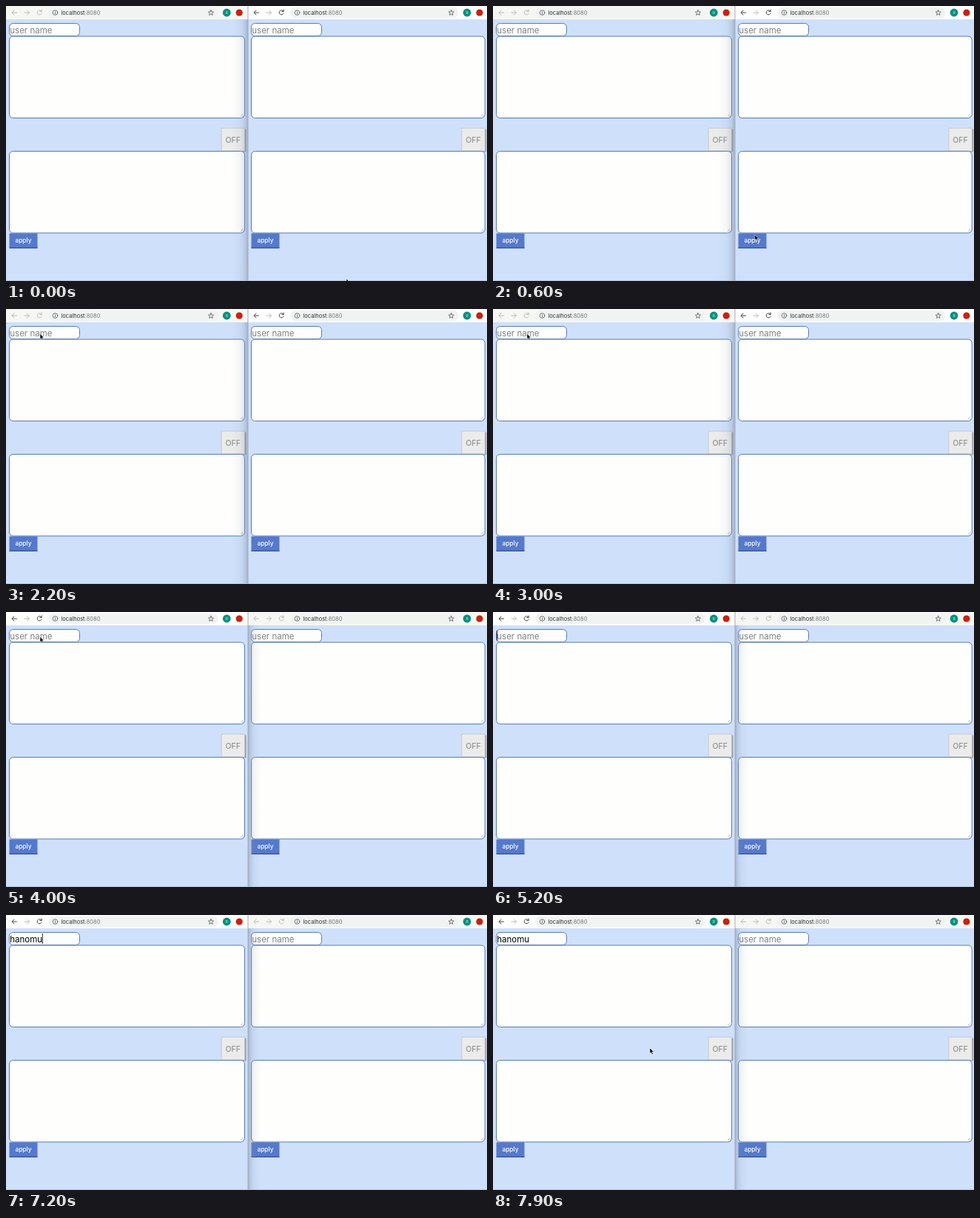
These frames come from a looping animation (650 by 372 pixels, 8000 ms). An HTML page:

```html
<!DOCTYPE html>
<html lang="en">
<head>
<meta charset="utf-8">
<title>Two chat windows</title>
<style>
html, body { margin: 0; width: 100%; height: 100%; overflow: hidden; background: #cfe0fb; }
svg { display: block; width: 650px; height: 372px; }
text { font-family: Inter, "Liberation Sans", sans-serif; white-space: pre; }
.icon { fill: none; stroke-width: 1; stroke-linecap: round; stroke-linejoin: round; }
.field { fill: #fefefd; stroke: #587bb0; stroke-width: 1; }
.grip { stroke: #8b9297; stroke-width: .6; }
</style>
</head>
<body>
<svg id="stage" viewBox="0 0 650 372">
  <defs>
    <linearGradient id="fade">
      <stop offset="0" stop-color="#8292ac" stop-opacity="0"/>
      <stop offset=".5" stop-color="#8292ac" stop-opacity=".08"/>
      <stop offset=".8" stop-color="#7d8ca6" stop-opacity=".25"/>
      <stop offset="1" stop-color="#728099" stop-opacity=".5"/>
    </linearGradient>
  </defs>
  <rect width="650" height="372" fill="#cfe0fb"/>
  <g id="windows"></g>
  <rect id="leftShade" x="305" width="22" y="18" height="354" fill="url(#fade)"/>
  <rect id="rightShade" width="18" height="354" fill="url(#fade)" transform="translate(345 18) scale(-1 1)"/>
  <rect x="326.5" width="1" height="372" fill="#a3abb8"/>
  <rect y="371.3" width="650" height=".7" fill="#b0b9c9"/>
  <rect id="caret" y="25" width="1" height="14" fill="#222"/>
  <path id="cursor" d="M0 0V7.2L1.7 5.7L2.9 8.4L4.2 7.8L3 5.2H5.2Z" fill="#000" stroke="#fff" stroke-width=".5"/>
</svg>
<script>
const LOOP = 8000, FOCUS = 3300, BLINK_START = 4200, TYPE_START = 5400, TYPE_STEP = 160;
const HIDE = 5000, SHOW = 7400;
const NAME = "hanomu";
const PATH = [
  [0, 460, 369], [200, 460, 369], [1300, 108, 172], [2200, 46, 33.5],
  [7400, 46, 33.5], [7900, 212, 180], [8000, 234, 190]
];
const $ = id => document.getElementById(id);

// x: left offset, r: offset of the right-aligned parts
function makeWindow(id, x, r) {
  const area = y => `<rect class="field" x="${x + 4.5}" y="${y}" width="${318 + r - x}" height="110.5" rx="5"/>
    <path class="grip" d="M${r + 317} ${y + 108.5}l3.5-3.5M${r + 319} ${y + 108.8}l1.6-1.6"/>`;
  return `<g id="${id}">
    <rect class="bar" x="${x}" width="${id === "L" ? 327 : 323}" height="18"/>
    <rect x="${x + 57}" y="2" width="${230 + r - x}" height="14" rx="7" fill="#f1f3f2"/>
    <g class="icon nav">
      <path d="M${x + 14.5} 9h-6.3M${x + 11} 6l-3 3l3 3"/>
      <path d="M${x + 48} 7.2a3.1 3.1 0 1 0 .2 2.7M${x + 48.2} 5v2.4h-2.4"/>
    </g>
    <path class="icon" stroke="#b9babc" d="M${x + 25} 9h6.3M${x + 28.5} 6l3 3l-3 3"/>
    <g class="icon" stroke="#55575a" style="stroke-width:.8">
      <circle cx="${x + 66.5}" cy="9" r="3.3"/>
      <path d="M${x + 66.5} 8.7v2M${x + 66.5} 7.2v.1"/>
      <path d="M${r + 277} 5.5l1 2.4 2.6.2-2 1.7.6 2.5-2.2-1.4-2.2 1.4.6-2.5-2-1.7 2.6-.2Z"/>
    </g>
    <text x="${x + 74.5}" y="11.8" font-size="7.5" fill="#303236">localhost<tspan fill="#74777b">:8080</tspan></text>
    <circle cx="${r + 298.3}" cy="9" r="5.4" fill="#07907f"/>
    <text x="${r + 298.3}" y="10.8" font-size="5" fill="#d5efe4" text-anchor="middle">R</text>
    <circle cx="${r + 315.2}" cy="9" r="4.6" fill="#cb2010"/>
    <rect class="field" x="${x + 4.5}" y="23.5" width="95" height="17" rx="5"/>
    <text class="name" x="${x + 5.3}" y="36.8" font-size="11.5" fill="#808080">user name</text>
    ${area(41)}
    <rect x="${r + 292.5}" y="166.5" width="32" height="31" rx="1" fill="#969ba5"/>
    <rect x="${r + 291.2}" y="165.2" width="31.3" height="30.8" fill="#ebebeb" stroke="#c6c6c4" stroke-width=".8"/>
    <text x="${r + 306.7}" y="185" font-size="10.5" font-weight="500" fill="#929292" text-anchor="middle">OFF</text>
    ${area(196.5)}
    <rect x="${x + 4.5}" y="307.5" width="38" height="20" fill="#5579cb"/>
    <rect x="${x + 4.5}" y="326.5" width="38" height="1.5" fill="#415d9d"/>
    <text x="${x + 23.5}" y="320" font-size="8.4" font-weight="500" fill="#fff" text-anchor="middle">apply</text>
  </g>`;
}

$("windows").innerHTML = makeWindow("L", 0, 0) + makeWindow("R", 327, 324.7);
const nameText = document.querySelector("#L .name");

function setActive(id, on) {
  document.querySelector(`#${id} .bar`).setAttribute("fill", on ? "#fefefd" : "#f6f7f3");
  document.querySelector(`#${id} .nav`).setAttribute("stroke", on ? "#45474a" : "#b9babc");
}

function cursorAt(t) {
  const i = Math.max(1, PATH.findIndex(p => p[0] >= t));
  const [t0, x0, y0] = PATH[i - 1], [t1, x1, y1] = PATH[i];
  const k = (t - t0) / (t1 - t0), e = k * k * (3 - 2 * k);
  return [x0 + (x1 - x0) * e, y0 + (y1 - y0) * e];
}

const show = (id, on) => $(id).setAttribute("visibility", on ? "visible" : "hidden");

function draw(t) {
  const leftActive = t >= FOCUS;
  setActive("L", leftActive);
  setActive("R", !leftActive);
  show("leftShade", !leftActive);
  show("rightShade", leftActive);

  const count = Math.max(0, Math.min(NAME.length, Math.floor((t - TYPE_START) / TYPE_STEP) + 1));
  nameText.textContent = count ? NAME.slice(0, count) : "user name";
  nameText.setAttribute("fill", count ? "#000" : "#808080");

  // Each key press restarts the blink.
  const since = count ? t - TYPE_START - (count - 1) * TYPE_STEP : t - BLINK_START;
  show("caret", since >= 0 && since % 1000 < 500);
  $("caret").setAttribute("x", 5 + (count ? nameText.getComputedTextLength() : 0));

  const [x, y] = cursorAt(t);
  $("cursor").setAttribute("transform", `translate(${x} ${y})`);
  show("cursor", t < HIDE || t >= SHOW);
}

const start = performance.now();
function tick() {
  draw((performance.now() - start) % LOOP);
  requestAnimationFrame(tick);
}
tick();
</script>
</body>
</html>
```
